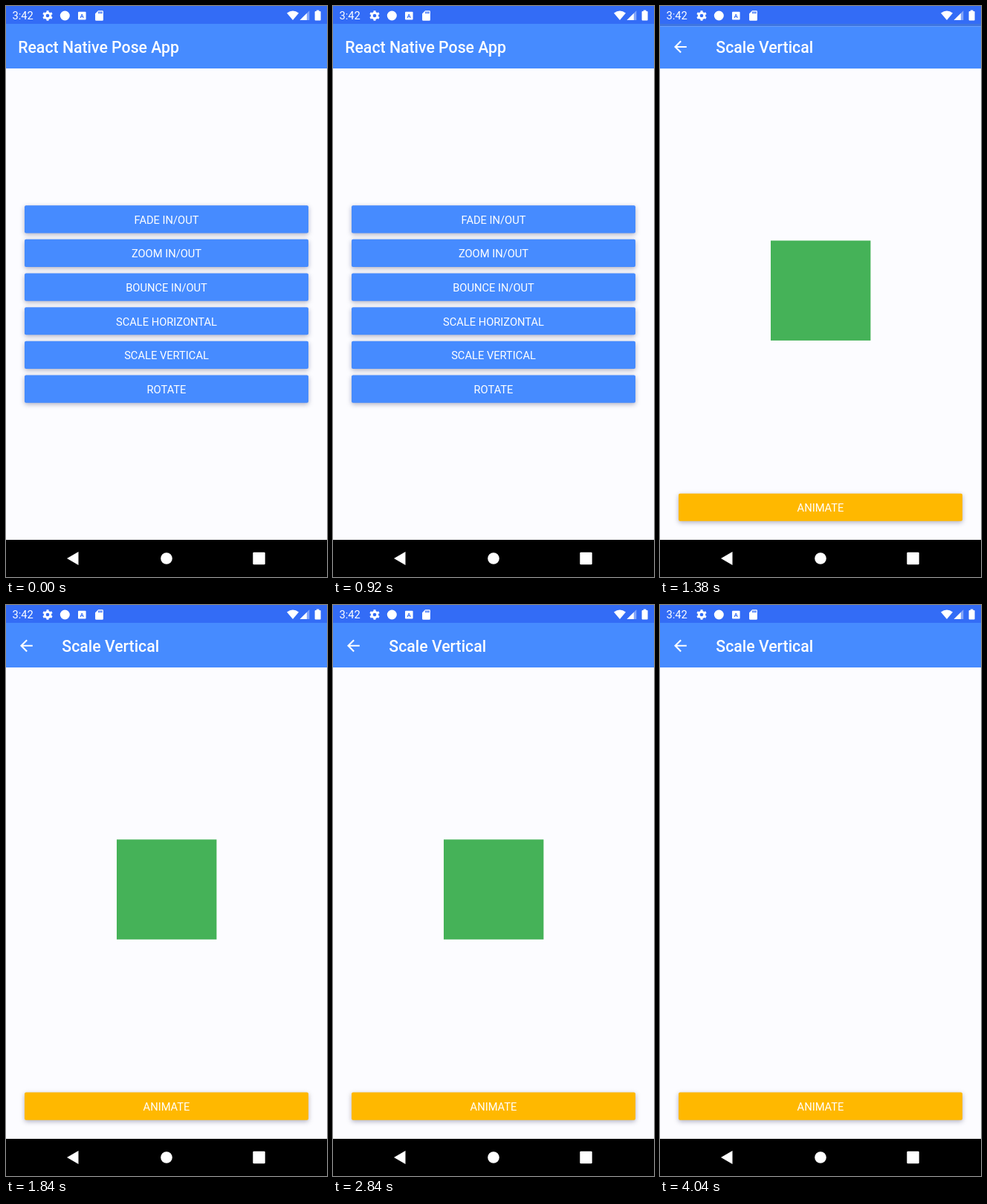
An HTML page with a canvas for the animation above (4080 ms loop, 432 px wide and 768 px high).

```html
<!DOCTYPE html>
<html lang="en">
<head>
<meta charset="utf-8">
<title>Pose App</title>
<style>
  html, body { margin: 0; width: 100%; height: 100%; overflow: hidden; background: #000; }
  canvas { display: block; width: 432px; height: 768px; }
</style>
</head>
<body>
<canvas id="stage" width="432" height="768"></canvas>
<script>
const ctx = document.getElementById('stage').getContext('2d');
const LOOP = 4080;
const W = 432, TOP = 24, BOTTOM = 718, CARD_H = BOTTOM - TOP;
const BLUE = '#468bff', STATUS = '#336cf6', PAPER = '#fcfcff';
const AMBER = '#ffb800', GREEN = '#45b258';
const MENU = ['FADE IN/OUT', 'ZOOM IN/OUT', 'BOUNCE IN/OUT',
  'SCALE HORIZONTAL', 'SCALE VERTICAL', 'ROTATE'];
const REVEAL = { start: 1034.7, length: 425 };
// Each entry: start time, scale before, scale after
const SCALES = [[1950, 1, 0], [2500, 0, 1], [3250, 1, 0]];
const SCALE_MS = 300;

const ARROW = new Path2D('M20 11H7.83l5.59-5.59L12 4l-8 8 8 8 1.41-1.41L7.83 13H20z');
const SD_CARD = new Path2D('M18 2h-8L4 8v12a2 2 0 0 0 2 2h12a2 2 0 0 0 2-2V4a2 2 0 0 0-2-2z' +
  'M12 8h-2V4h2zM15 8h-2V4h2zM18 8h-2V4h2z');

const clamp = v => Math.min(1, Math.max(0, v));
const easeInOut = v => v < 0.5 ? 2 * v * v : 1 - 2 * (1 - v) * (1 - v);

function bezier(x, x1, y1, x2, y2) {
  if (x <= 0 || x >= 1) return clamp(x);
  const at = (s, a, b) => 3 * (1 - s) * (1 - s) * s * a + 3 * (1 - s) * s * s * b + s * s * s;
  let lo = 0, hi = 1;
  for (let i = 0; i < 24; i++) {
    const mid = (lo + hi) / 2;
    if (at(mid, x1, x2) < x) lo = mid; else hi = mid;
  }
  return at(lo, y1, y2);
}

function rect(x, y, w, h, color) {
  ctx.fillStyle = color;
  ctx.fillRect(x, y, w, h);
}

function rounded(x, y, w, h, r, color) {
  ctx.fillStyle = color;
  ctx.beginPath();
  ctx.roundRect(x, y, w, h, r);
  ctx.fill();
}

function disc(x, y, r, color) {
  ctx.fillStyle = color;
  ctx.beginPath();
  ctx.arc(x, y, r, 0, Math.PI * 2);
  ctx.fill();
}

function poly(points, color) {
  ctx.fillStyle = color;
  ctx.beginPath();
  points.forEach(([x, y]) => ctx.lineTo(x, y));
  ctx.fill();
}

function icon(path, cx, cy, scale) {
  ctx.save();
  ctx.translate(cx, cy);
  ctx.scale(scale, scale);
  ctx.translate(-12, -12);
  ctx.fillStyle = '#fff';
  ctx.fill(path, 'evenodd');
  ctx.restore();
}

function label(text, x, y, size, weight = 400, align = 'left') {
  ctx.font = `${weight} ${size}px Roboto, sans-serif`;
  ctx.textAlign = align;
  ctx.fillStyle = '#fff';
  ctx.fillText(text, x, y);
}

function button(text, y, color) {
  ctx.save();
  ctx.shadowColor = 'rgba(40, 40, 80, 0.36)';
  ctx.shadowBlur = 6;
  ctx.shadowOffsetY = 2;
  rounded(25, y, 382, 37.2, 2, color);
  ctx.restore();
  label(text, 216, y + 24.6, 14.7, 400, 'center');
}

function page(title, titleX) {
  rect(0, TOP, W, CARD_H + 20, PAPER);
  rect(0, TOP, W, 60, BLUE);
  label(title, titleX, 63, 21.25, 500);
}

function home() {
  page('React Native Pose App', 16.2);
  MENU.forEach((text, i) => button(text, 268.2 + 45.65 * i, BLUE));
}

function detail(scale) {
  page('Scale Vertical', 75.3);
  icon(ARROW, 27.4, 54.8, 1.05);
  const h = 134.4 * scale;
  if (h > 0) rect(149, 382.6 - h / 2, 134.4, h, GREEN);
  button('ANIMATE', 655.5, AMBER);
}

function gear(x, y) {
  ctx.strokeStyle = '#fff';
  ctx.lineWidth = 3;
  ctx.beginPath();
  for (let i = 0; i < 3; i++) {
    const a = Math.PI / 6 + i * Math.PI / 3;
    const dx = 6.8 * Math.cos(a), dy = 6.8 * Math.sin(a);
    ctx.moveTo(x - dx, y - dy);
    ctx.lineTo(x + dx, y + dy);
  }
  ctx.stroke();
  disc(x, y, 5.2, '#fff');
  disc(x, y, 2.3, STATUS);
}

function statusBar() {
  rect(0, 0, W, TOP, STATUS);
  label('3:42', 8.5, 18.4, 14.7);
  gear(56, 13);
  disc(79.3, 13, 6.5, '#fff');

  rounded(97, 7.8, 10.6, 10.6, 1, '#fff');
  ctx.font = '700 8px Roboto, sans-serif';
  ctx.textAlign = 'center';
  ctx.fillStyle = STATUS;
  ctx.fillText('A', 102.3, 16);

  icon(SD_CARD, 125.5, 13, 0.68);

  ctx.fillStyle = '#fff';
  ctx.beginPath();
  ctx.moveTo(386, 19);
  ctx.lineTo(378, 9.4);
  ctx.quadraticCurveTo(386, 3.4, 394, 9.4);
  ctx.fill();

  poly([[395.5, 19], [408.3, 19], [408.3, 6.2]], 'rgba(255, 255, 255, 0.4)');
  poly([[395.5, 19], [404.8, 19], [404.8, 9.7]], '#fff');
  rounded(415.6, 7, 8, 12.6, 1, '#fff');
  rect(417.8, 5.6, 3.6, 2, '#fff');
}

function navBar() {
  rect(0, BOTTOM, W, 768 - BOTTOM, '#000');
  poly([[82, 743], [97.5, 734], [97.5, 752]], '#fff');
  disc(216, 743, 7.8, '#fff');
  rounded(332.3, 734.8, 16.4, 16.4, 1.2, '#fff');
}

function boxScale(t) {
  let scale = 1;
  for (const [start, from, to] of SCALES) {
    if (t >= start) scale = from + (to - from) * easeInOut(clamp((t - start) / SCALE_MS));
  }
  return scale;
}

function draw(t) {
  const p = bezier((t - REVEAL.start) / REVEAL.length, 0.20833, 0.82, 0.25, 1);
  const gap = CARD_H * (1 - p);

  if (p < 1) {
    ctx.save();
    ctx.translate(0, -0.02 * CARD_H * p);
    home();
    ctx.restore();
    rect(0, TOP, W, CARD_H, `rgba(20, 5, 40, ${0.15 * clamp(p / 0.36)})`);
  }
  if (p > 0) {
    ctx.save();
    ctx.beginPath();
    ctx.rect(0, TOP + gap, W, CARD_H);
    ctx.clip();
    ctx.translate(0, 0.041 * gap);
    detail(boxScale(t));
    ctx.restore();
  }
  statusBar();
  navBar();
}

const begin = performance.now();
function tick() {
  draw((performance.now() - begin) % LOOP);
  requestAnimationFrame(tick);
}
tick();
</script>
</body>
</html>
```
